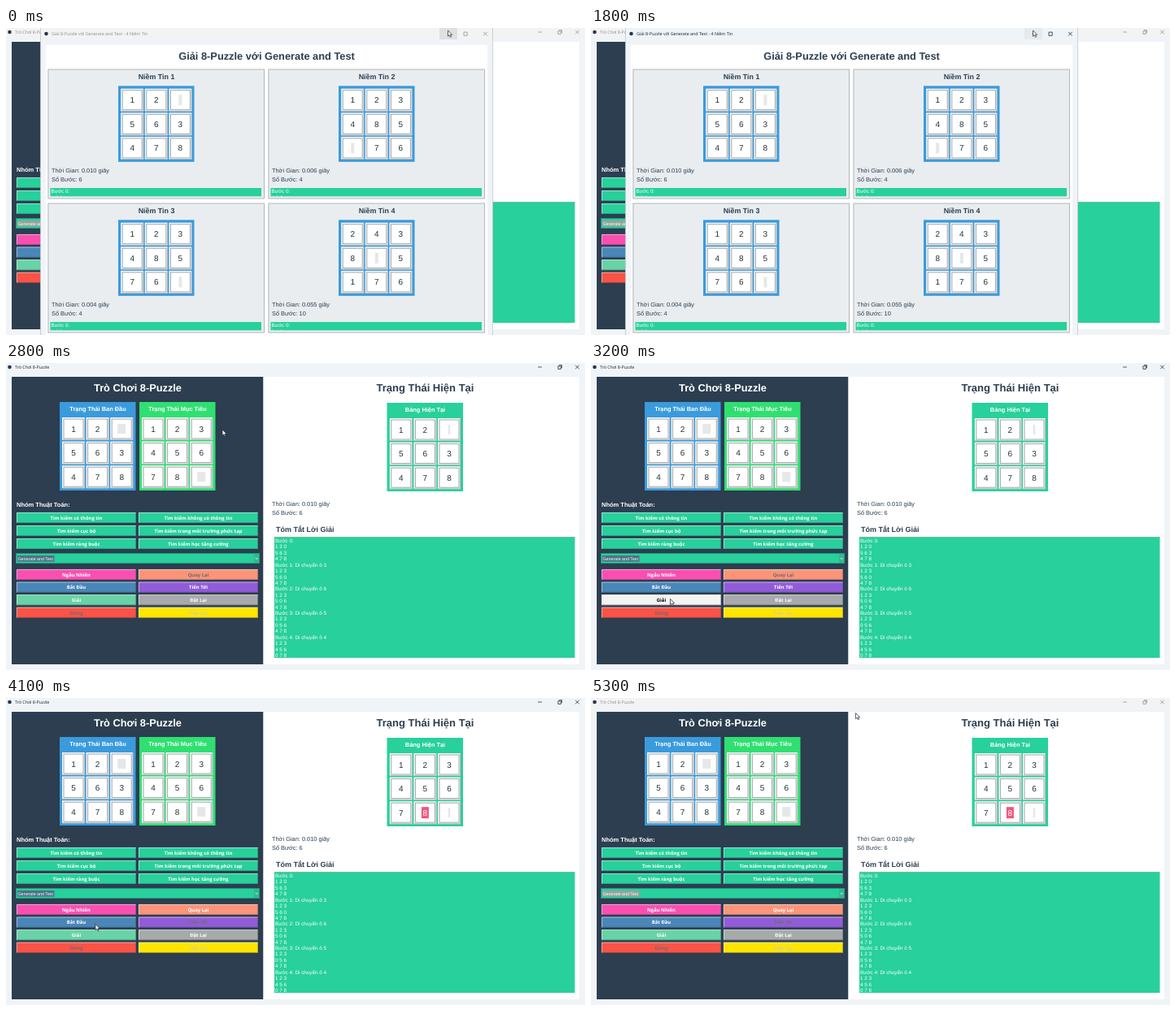
Write an HTML page that moves like this. It is 712 px wide and 378 px high and loops after 5400 ms.

```html
<!DOCTYPE html>
<html lang="vi">
<head>
<meta charset="utf-8">
<title>8-Puzzle</title>
<style>
html, body { margin: 0; width: 100%; height: 100%; overflow: hidden; background: #f0f4f8; }
svg { display: block; width: 100vw; height: 100vh; }
text { font-family: "Liberation Sans", Arial, sans-serif; text-rendering: geometricPrecision; white-space: pre; }
.ui { font-family: "Open Sans", "Noto Sans", sans-serif; }
.b { font-weight: 700; }
.m { text-anchor: middle; }
</style>
</head>
<body>
<svg id="stage" viewBox="0 0 712 378" xmlns="http://www.w3.org/2000/svg"></svg>
<script>
const LOOP = 5400, STEP = 100;
const NAVY = '#2c3e50', TEAL = '#28d09b', BLUE = '#3a9bdc', LIME = '#2fe071', WHITE = '#fff', OFF = '#6d6d6d';
const MOVES = [3, 6, 5, 4, 7, 8];
const START = '120563478';

const rect = (x, y, w, h, fill, extra = '') =>
  `<rect x="${x}" y="${y}" width="${w}" height="${h}" fill="${fill}" ${extra}/>`;
const text = (x, y, size, fill, str, cls = '') =>
  `<text x="${x}" y="${y}" font-size="${size}" fill="${fill}" class="${cls}">${str}</text>`;
const line = (d, color, w = 0.8, extra = '') =>
  `<path d="${d}" fill="none" stroke="${color}" stroke-width="${w}" ${extra}/>`;
const group = (id, body) => `<g id="${id}">${body}</g>`;

// Board states after each move, with 0 as the gap
const states = MOVES.reduce((list, tile) => {
  const last = list[list.length - 1];
  list.push(last.replace(/./g, c => c === '0' ? tile : +c === tile ? 0 : c));
  return list;
}, [START]);

function tile(cx, cy, value, hot, gap) {
  let s = rect(cx - 14, cy - 14, 28, 28, '#f8f9f9');
  s += rect(cx - 12, cy - 12, 24, 24, WHITE, 'stroke="#a2a8ab" stroke-width="1"');
  s += line(`M${cx - 13.6} ${cy + 13.6}h27.2v-27.2`, '#a6adb1', 0.8);
  if (value === '0') return s + rect(cx - gap[0] / 2, cy - gap[1] / 2, ...gap, '#e6e7e9');
  if (hot) s += rect(cx - 4.5, cy - 7, 9, 14, '#ef587d');
  return s + text(cx, cy + 3.5, 10, hot ? WHITE : '#263238', value, 'm');
}

const tiles = (x, y, cells, gap, hot) => [...cells].map((v, i) =>
  tile(x + 29.6 * (i % 3), y + 29.6 * Math.floor(i / 3), v, +v === hot, gap)).join('');

const titledBoard = (x, y, color, title, inner) =>
  rect(x, y, 93.5, 109, color) + text(x + 47, y + 10.8, 7.4, WHITE, title, 'b m') + inner;

function button(col, y, fill, label, color = WHITE) {
  const x = col ? 163 : 13;
  return rect(x, y, 147, 13, fill) +
    line(`M${x + 0.4} ${y + 13}v-12.6h146.6`, 'rgba(255,255,255,.65)') +
    line(`M${x} ${y + 12.6}h146.6v-12.6`, 'rgba(40,50,60,.4)') +
    text(x + 73.5, y + 8.7, 5.9, color, label, 'ui b m');
}

function controls(x, y, restore) {
  const box = restore
    ? `M${x + 22.4} ${y - 1.2}h3.4v3.6h-3.4zM${x + 23.6} ${y - 2.4}h3.4v3.6`
    : `M${x + 16} ${y - 2.1}h4.2v4.2h-4.2z`;
  const cx = x + (restore ? 46 : 42.4);
  const min = restore ? `M${x - 2.3} ${y}h4.6` : '';
  return line(`${min}${box}M${cx - 2.3} ${y - 2.3}l4.6 4.6m0 -4.6l-4.6 4.6`, 'currentColor', 0.75);
}

const stats = (x, y, time, steps) =>
  text(x, y, 7.4, NAVY, `Thời Gian: ${time} giây`) + text(x, y + 11.4, 7.4, NAVY, `Số Bước: ${steps}`);

function solutionLog() {
  const rows = [];
  for (let i = 0; i < 5; i++) {
    rows.push(i ? `Bước ${i}: Di chuyển ô ${MOVES[i - 1]}` : 'Bước 0:');
    for (let r = 0; r < 9; r += 3) rows.push([...states[i].slice(r, r + 3)].join(' '));
  }
  return rows.map((row, i) => text(331, 221 + 7.42 * i, 6.3, WHITE, row)).join('');
}

function mainWindow() {
  return rect(0, 0, 712, 378, '#f0f4f8') +
    group('mainBar', rect(0, 0, 712, 12, 'var(--bar)') + '<circle cx="4.5" cy="5" r="2.3" fill="#26364f"/>' +
      text(11, 7.3, 5.3, 'currentColor', 'Trò Chơi 8-Puzzle', 'ui') + controls(654 + 2.5, 5, true)) +
    rect(7, 17, 309.5, 354, NAVY) + rect(316.5, 17, 388.5, 354, WHITE) +
    text(162, 35, 12.8, WHITE, 'Trò Chơi 8-Puzzle', 'b m') +
    titledBoard(66, 48, BLUE, 'Trạng Thái Ban Đầu', tiles(83, 81, START, [10, 12])) +
    titledBoard(164, 48, LIME, 'Trạng Thái Mục Tiêu', tiles(181, 81, '123456780', [10, 12])) +
    text(13, 177, 7.5, WHITE, 'Nhóm Thuật Toán:', 'b') +
    button(0, 184, TEAL, 'Tìm kiếm có thông tin') + button(1, 184, TEAL, 'Tìm kiếm không có thông tin') +
    button(0, 200, TEAL, 'Tìm kiếm cục bộ') + button(1, 200, TEAL, 'Tìm kiếm trong môi trường phức tạp') +
    button(0, 216, TEAL, 'Tìm kiếm ràng buộc') + button(1, 216, TEAL, 'Tìm kiếm học tăng cường') +
    rect(12.4, 234.4, 299.2, 12.2, TEAL, 'stroke="#149f78" stroke-width="0.8"') +
    '<rect id="pick" x="14" y="237" width="45.5" height="7.6"/>' +
    text(14.5, 242.8, 5.3, WHITE, 'Generate and Test') +
    rect(305, 235, 6.2, 11, '#31b98f') + line('M306.7 240l1.5 1.5l1.5 -1.5', WHITE, 0.8) +
    group('actions', '') +
    text(515.5, 35, 13, NAVY, 'Trạng Thái Hiện Tại', 'b m') +
    titledBoard(468.5, 49, TEAL, 'Bảng Hiện Tại', group('current', '')) +
    stats(327, 175.6, '0.010', 6) +
    text(332, 208.4, 9, NAVY, 'Tóm Tắt Lời Giải', 'b') +
    rect(330, 214, 369.5, 149, TEAL) + line('M330 214.4h369.5', '#8fb8aa', 0.8) + solutionLog();
}

function actions(step, pressed) {
  return button(0, 254, '#fa4fb1', 'Ngẫu Nhiên') +
    button(1, 254, '#fb9478', 'Quay Lại', step ? WHITE : OFF) +
    button(0, 269.6, '#4a86b8', 'Bắt Đầu') +
    button(1, 269.6, '#925cd9', 'Tiến Tới', step < MOVES.length ? WHITE : OFF) +
    button(0, 285.2, pressed ? '#f3f3f1' : '#68d3a6', 'Giải', pressed ? '#000' : WHITE) +
    button(1, 285.2, '#a8a9aa', 'Đặt Lại') +
    button(0, 300.8, '#fb5346', 'Dừng', OFF) +
    button(1, 300.8, '#ffe500', 'Tiếp Tục', '#d3cda0');
}

function card(i, cells, time, steps) {
  const x = 271 * (i % 2), y = 165 * Math.floor(i / 2);
  const first = [...cells.slice(0, 3)].join(' ');
  return `<g transform="translate(${x} ${y})">` +
    rect(51.9, 51, 265.6, 159, '#e9edf0', 'stroke="#a9b0b4" stroke-width="0.9"') +
    text(185, 63.3, 8.9, NAVY, `Niềm Tin ${i + 1}`, 'b m') +
    rect(138, 71.3, 93.5, 93.5, BLUE) + tiles(155.2, 88.7, cells, [4, 13]) +
    stats(56, 177.8, time, steps) +
    rect(54.5, 197, 259.5, 10.3, TEAL) +
    `<g clip-path="url(#slot)">` + text(55.5, 203.2, 6.3, WHITE, 'Bước 0:') +
    text(55.5, 210.6, 6.3, WHITE, first) + '</g></g>';
}

function popup() {
  return rect(42.5, -2, 556, 384, '#f0f4f8', 'stroke="#c3c7cb" stroke-width="0.8"') +
    group('popBar', rect(43, 0, 555, 14, 'var(--bar)') + rect(533, 0, 22, 14, 'var(--hover)') +
      '<circle cx="49.5" cy="7" r="2.3" fill="#26364f"/>' +
      text(56, 9.2, 5.35, 'currentColor', 'Giải 8-Puzzle với Generate and Test - 4 Niềm Tin', 'ui') +
      line('M542.5 7h4.6', 'currentColor', 0.75) + controls(547, 7.2, false)) +
    rect(49, 21, 543, 357, WHITE) +
    text(320.5, 38.7, 12.8, NAVY, 'Giải 8-Puzzle với Generate and Test', 'b m') +
    card(0, START, '0.010', 6) + card(1, '123485076', '0.006', 4) +
    card(2, '123485760', '0.004', 4) + card(3, '243805176', '0.055', 10);
}

const $ = id => document.getElementById(id);
$('stage').innerHTML =
  '<defs><clipPath id="slot"><rect x="54.5" y="197" width="259.5" height="10.3"/></clipPath></defs>' +
  group('main', mainWindow()) + group('popup', popup()) +
  '<path id="cursor" d="M0 0v7.2l1.7-1.5l1.2 2.6l1.2-.6l-1.2-2.4h2.3z" fill="#fff" stroke="#222" stroke-width="0.7"/>';

// Pointer path: time, x, y
const PATH = [
  [0, 543.5, 3], [2200, 543.5, 3], [2300, 531, 24], [2800, 266, 82], [3000, 97.5, 290.5],
  [3900, 97.5, 290.5], [4000, 100, 289], [4100, 110, 278.5], [4400, 157, 209], [4500, 158.5, 217],
  [4900, 318.5, 49], [5000, 323.5, 28], [5100, 325.5, 18.5], [5400, 325.5, 18.5]
];

function pointer(t) {
  const i = PATH.findIndex(p => p[0] > t);
  const [t0, x0, y0] = PATH[i - 1], [t1, x1, y1] = PATH[i];
  const k = (t - t0) / (t1 - t0);
  return [x0 + (x1 - x0) * k, y0 + (y1 - y0) * k];
}

function focusBar(id, on) {
  const style = $(id).style;
  style.color = on ? '#1c1c1c' : '#8b8b8b';
  style.setProperty('--bar', on ? '#eff4f9' : '#f3f3f3');
  style.setProperty('--hover', on ? '#e6eaee' : '#e0e0e0');
}

let shown = -1;
function draw(now) {
  const t = Math.floor(now % LOOP / STEP) * STEP;
  if (t === shown) return;
  shown = t;
  const focused = t >= 2300 && t < 5200;
  const step = Math.max(0, Math.min(6, Math.round((t - 3200) / 500 * 6)));
  $('popup').style.display = t < 2300 ? '' : 'none';
  focusBar('mainBar', focused);
  focusBar('popBar', t >= 1400);
  $('pick').setAttribute('fill', focused ? '#4d7288' : '#93a39d');
  $('actions').innerHTML = actions(step, t === 3200);
  $('current').innerHTML = tiles(485.8, 82, states[step], [2.5, 12], MOVES[step - 1]);
  $('cursor').setAttribute('transform', `translate(${pointer(t).join(' ')})`);
}

function tick() {
  draw(performance.now());
  requestAnimationFrame(tick);
}
tick();
</script>
</body>
</html>
```
